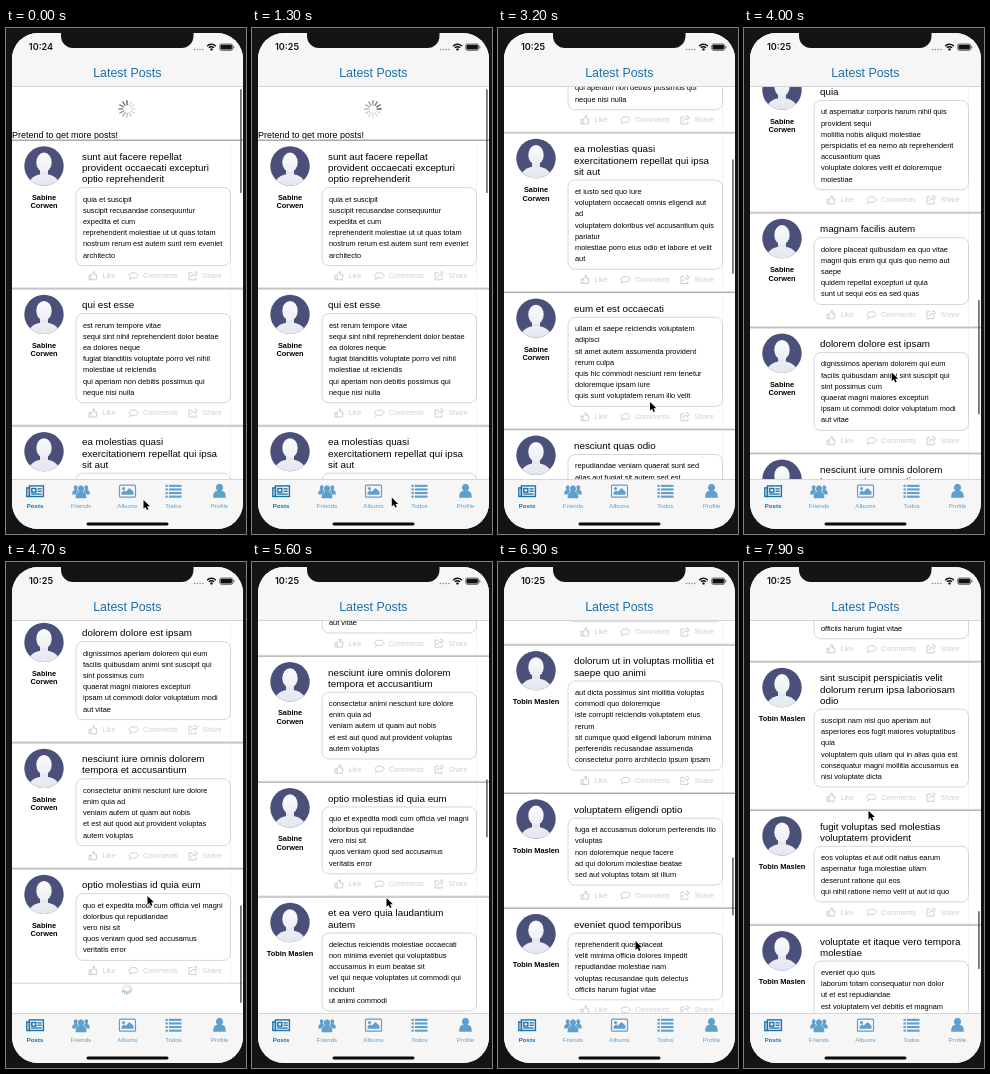
Recreate the animation shown at these times as an HTML page with a canvas. Size 240x506 px, loop 8 s.

```html
<!DOCTYPE html>
<html lang="en">
<head>
<meta charset="utf-8">
<title>Latest Posts</title>
<style>
html, body { margin: 0; width: 100%; height: 100%; overflow: hidden; background: #141414; }
canvas { display: block; width: 240px; height: 506px; }
</style>
</head>
<body>
<canvas id="stage"></canvas>
<script>
const W = 240, H = 506, LOOP = 8000;
const TOP = 59, BOTTOM = 451, VIEW = BOTTOM - TOP;
const REFRESH_END = 1500, MORE_LOADED = 4950, PAGE = 10;
const SANS = '"Liberation Sans", Arial, sans-serif';
const STATUS = 'Inter, "Liberation Sans", sans-serif';
const LINE = 11.2;
const BEZEL = '#141414', BAR = '#f6f6f7';

const canvas = document.getElementById('stage');
const ctx = canvas.getContext('2d');
const dpr = window.devicePixelRatio || 1;
canvas.width = W * dpr;
canvas.height = H * dpr;

// title lines / body lines, separated by "|"
const posts = [
  ['sunt aut facere repellat|provident occaecati excepturi|optio reprehenderit',
   'quia et suscipit|suscipit recusandae consequuntur|expedita et cum|reprehenderit molestiae ut ut quas totam|nostrum rerum est autem sunt rem eveniet|architecto'],
  ['qui est esse',
   'est rerum tempore vitae|sequi sint nihil reprehenderit dolor beatae|ea dolores neque|fugiat blanditiis voluptate porro vel nihil|molestiae ut reiciendis|qui aperiam non debitis possimus qui|neque nisi nulla'],
  ['ea molestias quasi|exercitationem repellat qui ipsa|sit aut',
   'et iusto sed quo iure|voluptatem occaecati omnis eligendi aut|ad|voluptatem doloribus vel accusantium quis|pariatur|molestiae porro eius odio et labore et velit|aut'],
  ['eum et est occaecati',
   'ullam et saepe reiciendis voluptatem|adipisci|sit amet autem assumenda provident|rerum culpa|quis hic commodi nesciunt rem tenetur|doloremque ipsam iure|quis sunt voluptatem rerum illo velit'],
  ['nesciunt quas odio',
   'repudiandae veniam quaerat sunt sed|alias aut fugiat sit autem sed est|voluptatem omnis possimus esse|voluptatibus quis|est aut tenetur dolor neque'],
  ['dolorem eum magni eos aperiam|quia',
   'ut aspernatur corporis harum nihil quis|provident sequi|mollitia nobis aliquid molestiae|perspiciatis et ea nemo ab reprehenderit|accusantium quas|voluptate dolores velit et doloremque|molestiae'],
  ['magnam facilis autem',
   'dolore placeat quibusdam ea quo vitae|magni quis enim qui quis quo nemo aut|saepe|quidem repellat excepturi ut quia|sunt ut sequi eos ea sed quas'],
  ['dolorem dolore est ipsam',
   'dignissimos aperiam dolorem qui eum|facilis quibusdam animi sint suscipit qui|sint possimus cum|quaerat magni maiores excepturi|ipsam ut commodi dolor voluptatum modi|aut vitae'],
  ['nesciunt iure omnis dolorem|tempora et accusantium',
   'consectetur animi nesciunt iure dolore|enim quia ad|veniam autem ut quam aut nobis|et est aut quod aut provident voluptas|autem voluptas'],
  ['optio molestias id quia eum',
   'quo et expedita modi cum officia vel magni|doloribus qui repudiandae|vero nisi sit|quos veniam quod sed accusamus|veritatis error'],
  ['et ea vero quia laudantium|autem',
   'delectus reiciendis molestiae occaecati|non minima eveniet qui voluptatibus|accusamus in eum beatae sit|vel qui neque voluptates ut commodi qui|incidunt|ut animi commodi'],
  ['in quibusdam tempore odit est|dolorem',
   'itaque id aut magnam|praesentium quia et ea odit et ea voluptas|et|sapiente quia nihil amet occaecati quia id|voluptatem|incidunt ea est distinctio odio'],
  ['dolorum ut in voluptas mollitia et|saepe quo animi',
   'aut dicta possimus sint mollitia voluptas|commodi quo doloremque|iste corrupti reiciendis voluptatem eius|rerum|sit cumque quod eligendi laborum minima|perferendis recusandae assumenda|consectetur porro architecto ipsum ipsam'],
  ['voluptatem eligendi optio',
   'fuga et accusamus dolorum perferendis illo|voluptas|non doloremque neque facere|ad qui dolorum molestiae beatae|sed aut voluptas totam sit illum'],
  ['eveniet quod temporibus',
   'reprehenderit quos placeat|velit minima officia dolores impedit|repudiandae molestiae nam|voluptas recusandae quis delectus|officiis harum fugiat vitae'],
  ['sint suscipit perspiciatis velit|dolorum rerum ipsa laboriosam|odio',
   'suscipit nam nisi quo aperiam aut|asperiores eos fugit maiores voluptatibus|quia|voluptatem quis ullam qui in alias quia est|consequatur magni mollitia accusamus ea|nisi voluptate dicta'],
  ['fugit voluptas sed molestias|voluptatem provident',
   'eos voluptas et aut odit natus earum|aspernatur fuga molestiae ullam|deserunt ratione qui eos|qui nihil ratione nemo velit ut aut id quo'],
  ['voluptate et itaque vero tempora|molestiae',
   'eveniet quo quis|laborum totam consequatur non dolor|ut et est repudiandae|est voluptatem vel debitis et magnam']
];

let listEnd = 0;
const items = posts.map(([title, body], i) => {
  const item = {
    title: title.split('|'),
    body: body.split('|'),
    author: i < PAGE ? ['Sabine', 'Corwen'] : ['Tobin Maslen'],
    top: listEnd
  };
  item.height = 70 + LINE * (item.title.length + item.body.length - 2);
  listEnd += item.height;
  return item;
});

const scrollKeys = [
  [0, -53], [REFRESH_END, -53], [1900, 0], [2450, 0], [3200, 239.7], [3700, 500],
  [4300, 900], [4600, 965], [5100, 965], [5600, 1051.4], [6200, 1290],
  [6900, 1577.6], [7400, 1760], [7900, 1938.8], [8000, 1968]
];
const cursorX = [[0, 137.5], [2400, 144], [3200, 152], [4700, 141.5], [5600, 134.5], [6900, 137.5], [7900, 124.5], [8000, 124.5]];
const cursorY = [[0, 472], [2400, 464], [3200, 374], [4700, 334], [5600, 336], [6900, 379], [7900, 248.7], [8000, 247]];

// Monotone cubic through [time, value] points
function track(keys, t) {
  const slope = i => i < 0 || i > keys.length - 2 ? 0
    : (keys[i + 1][1] - keys[i][1]) / (keys[i + 1][0] - keys[i][0]);
  const tangent = i => {
    const a = slope(i - 1), b = slope(i);
    return a * b <= 0 ? 0 : 2 * a * b / (a + b);
  };
  let i = 0;
  while (i < keys.length - 2 && t >= keys[i + 1][0]) i++;
  const [t0, v0] = keys[i], [t1, v1] = keys[i + 1];
  const d = t1 - t0, u = Math.min(1, (t - t0) / d), u2 = u * u, u3 = u2 * u;
  return v0 * (2 * u3 - 3 * u2 + 1) + v1 * (3 * u2 - 2 * u3)
    + d * tangent(i) * (u3 - 2 * u2 + u) + d * tangent(i + 1) * (u3 - u2);
}

function text(str, x, cy, size, color, align = 'left', weight = 400, family = SANS) {
  ctx.font = `${weight} ${size}px ${family}`;
  ctx.fillStyle = color;
  ctx.textAlign = align;
  ctx.fillText(str, x, cy + size * 0.34);
}

function rect(x, y, w, h, color) {
  ctx.fillStyle = color;
  ctx.fillRect(x, y, w, h);
}

function rounded(x, y, w, h, r) {
  ctx.beginPath();
  ctx.roundRect(x, y, w, h, r);
}

function disc(x, y, rx, ry, color) {
  ctx.fillStyle = color;
  ctx.beginPath();
  ctx.ellipse(x, y, rx, ry, 0, 0, Math.PI * 2);
  ctx.fill();
}

function at(x, y, draw) {
  ctx.save();
  ctx.translate(x, y);
  draw();
  ctx.restore();
}

// Icon paths are drawn around their own centre
const icons = {
  thumb: new Path2D('M-4 -.5h2v4.5h-2zM-2 -.3L0 -2.4V-4H1.4V-1H4L3.3 4H-2'),
  bubble: new Path2D('M0 -3C6 -3 6 2.4 0 2.4L-2 2.2L-4 3.8L-3.2 1.6C-6 -.2 -4 -3 0 -3z'),
  share: new Path2D('M-.5 -3H-4V4H3V1.6M-1.8 1.8C-1.8 -.6 0 -1.4 2 -1.4V.3L4.6 -2.2L2 -4.4V-2.8'),
  person: new Path2D('M0 -7a3.4 3.6 0 0 1 1.8 6.6C5 0 5.8 2 5.8 6H-5.8C-5.8 2 -5 0 -1.8 -.4A3.4 3.6 0 0 1 0 -7z'),
  mountains: new Path2D('M-6 3.6V1.4L-3.4 -1L-1.8 .5L2 -3.2L6 .6V3.6z')
};

function avatar(x, y) {
  at(x, y, () => {
    disc(0, 0, 19.7, 19.7, '#4a5079');
    ctx.clip();
    const shade = ctx.createLinearGradient(0, -14, 0, 20);
    shade.addColorStop(0, '#fafbfc');
    shade.addColorStop(1, '#e2e7ee');
    rect(-4, 0, 8, 11, '#e2e7ee');
    disc(0, 19, 15.5, 11, shade);
    disc(0, -3.6, 7.7, 9.8, shade);
  });
}

function action(icon, label, x, y) {
  at(x, y, () => {
    ctx.strokeStyle = '#c8c8ca';
    ctx.lineWidth = 0.9;
    ctx.stroke(icons[icon]);
  });
  text(label, x + 9.5, y, 7.2, '#cfcfd1');
}

function separator(y) {
  rect(6, y - 1, 231, 1, '#d6d6d6');
  rect(6, y, 231, 1, '#aaaaaa');
}

function drawItem(item, y) {
  separator(y);
  rect(224.3, y + 2, 0.7, item.height - 4, '#ededef');
  avatar(38, y + 26);
  item.author.forEach((s, i) => text(s, 38, y + 57 + i * 8.5, 7.4, '#000', 'center', 700));
  item.title.forEach((s, i) => text(s, 76, y + 16.5 + i * LINE, 9.8, '#000'));
  const lastTitle = y + 16 + LINE * (item.title.length - 1);
  const first = lastTitle + 20.6;
  const last = first + LINE * (item.body.length - 1);
  rounded(70, lastTitle + 9.2, 154.5, last - first + 22, 7);
  ctx.strokeStyle = '#d2d2d4';
  ctx.lineWidth = 0.9;
  ctx.stroke();
  item.body.forEach((s, i) => text(s, 77, first + i * LINE, 7.4, '#000'));
  action('thumb', 'Like', 87, last + 20.8);
  action('bubble', 'Comments', 127.5, last + 20.8);
  action('share', 'Share', 187, last + 20.8);
}

function spinner(x, y, inner, outer, rgb, t) {
  const head = Math.floor(t / 1000 * 12);
  at(x, y, () => {
    ctx.lineCap = 'round';
    ctx.lineWidth = outer / 6;
    for (let i = 0; i < 12; i++) {
      const age = ((head - i) % 12 + 12) % 12;
      const a = i * Math.PI / 6 - Math.PI / 2;
      ctx.strokeStyle = `rgba(${rgb},${Math.max(0.2, 0.9 - age * 0.085)})`;
      ctx.beginPath();
      ctx.moveTo(Math.cos(a) * inner, Math.sin(a) * inner);
      ctx.lineTo(Math.cos(a) * outer, Math.sin(a) * outer);
      ctx.stroke();
    }
  });
}

function drawIndicator(scroll, loaded, t) {
  const fade = t < 2500 ? 1 - (t - 1900) / 300 : (t - 2500) / 100;
  const alpha = Math.max(0, Math.min(1, fade));
  if (!alpha) return;
  const total = loaded ? 2640 : 1340;
  const over = Math.max(-scroll * 0.2, scroll - (total - VIEW), 0);
  const h = VIEW * VIEW / total - over;
  const y = Math.min(TOP + 2 + Math.max(0, scroll) * VIEW / total, BOTTOM - 1 - h);
  rounded(234, y, 1.8, h, 0.9);
  ctx.fillStyle = `rgba(70,70,72,${0.75 * alpha})`;
  ctx.fill();
}

function drawList(t) {
  const scroll = track(scrollKeys, t);
  const loaded = t >= MORE_LOADED;
  ctx.save();
  ctx.beginPath();
  ctx.rect(6, TOP, 231, VIEW);
  ctx.clip();
  if (scroll < -1) {
    ctx.globalAlpha = Math.min(1, -scroll / 50);
    spinner(121, 81, 4.2, 8.3, '85,85,90', t);
    ctx.globalAlpha = 1;
    text('Pretend to get more posts!', 6, TOP - scroll - 5, 9, '#000');
  }
  for (const item of loaded ? items : items.slice(0, PAGE)) {
    const y = TOP + item.top - scroll;
    if (y < BOTTOM && y + item.height > TOP) drawItem(item, y);
  }
  if (!loaded) {
    const y = TOP + items[PAGE].top - scroll;
    rect(6, y - 0.5, 231, 1, '#cfd2d6');
    spinner(121, y + 6, 2.7, 5.4, '40,125,190', t);
  }
  drawIndicator(scroll, loaded, t);
  ctx.restore();
}

function drawStatus(t) {
  text(t < 500 ? '10:24' : '10:25', 35, 19, 9.1, '#111', 'center', 600, STATUS);
  for (let i = 0; i < 4; i++) disc(188.5 + i * 2.8, 21.5, 0.8, 0.8, '#888');
  ctx.strokeStyle = '#111';
  ctx.lineCap = 'butt';
  ctx.lineWidth = 1.4;
  for (const r of [3.6, 6]) {
    ctx.beginPath();
    ctx.arc(205.5, 22.3, r, -Math.PI * 0.76, -Math.PI * 0.24);
    ctx.stroke();
  }
  disc(205.5, 21.4, 1.2, 1.2, '#111');
  ctx.lineWidth = 0.6;
  rounded(213.7, 16, 13, 6.4, 1.8);
  ctx.stroke();
  rounded(214.5, 16.8, 11.4, 4.8, 1);
  ctx.fillStyle = '#111';
  ctx.fill();
  rect(227.3, 18, 1, 2.4, '#555');
}

function drawNav(t) {
  rect(6, 5, 231, TOP - 5, BAR);
  rect(6, TOP - 1, 231, 1, '#d4d4d6');
  text('Latest Posts', 121.3, 45, 12.4, '#1b70a9', 'center');
  drawStatus(t);
}

const tabs = [
  ['Posts', 29, c => {
    ctx.strokeStyle = c;
    ctx.lineWidth = 1.4;
    ctx.strokeRect(-5.6, -5.3, 14, 10.6);
    ctx.strokeRect(-8.2, -3.3, 2.6, 8.6);
    ctx.strokeRect(-3.2, -2.7, 4, 3.6);
    for (const y of [-3, -0.6]) rect(2.5, y, 4.2, 1.3, c);
    rect(-3.8, 2.2, 10.5, 1.3, c);
  }],
  ['Friends', 75, c => {
    ctx.fillStyle = c;
    for (const x of [-5.2, 5.2]) at(x, -1, () => { ctx.scale(0.62, 0.7); ctx.fill(icons.person); });
    ctx.strokeStyle = BAR;
    ctx.lineWidth = 1.2;
    at(0, 1, () => { ctx.scale(0.92, 1); ctx.stroke(icons.person); ctx.fill(icons.person); });
  }],
  ['Albums', 121.5, c => {
    ctx.strokeStyle = ctx.fillStyle = c;
    ctx.lineWidth = 1.2;
    rounded(-8, -6, 16, 12, 1);
    ctx.stroke();
    ctx.fill(icons.mountains);
    disc(-4, -2.8, 1.5, 1.5, c);
  }],
  ['Todos', 167.5, c => {
    for (const y of [-6.4, -2.8, 0.8, 4.4]) {
      rect(-8, y, 2.3, 2.1, c);
      rect(-4.6, y, 12.6, 2.1, c);
    }
  }],
  ['Profile', 213.5, c => {
    ctx.fillStyle = c;
    ctx.scale(1.08, 1.08);
    ctx.fill(icons.person);
  }]
];

function drawTabs() {
  rect(6, BOTTOM, 231, 50, BAR);
  rect(6, BOTTOM, 231, 0.8, '#cfcfd1');
  tabs.forEach(([label, x, icon], i) => {
    const color = i ? '#5f9fca' : '#1872ad';
    at(x, 463.2, () => icon(color));
    text(label, x, 478.2, 6.1, color, 'center', i ? 400 : 700);
  });
  rounded(80.5, 494.5, 82, 3, 1.5);
  ctx.fillStyle = '#0a0a0a';
  ctx.fill();
}

const arrow = new Path2D('M0 0V8.8L2.1 6.9L3.5 10L5 9.3L3.6 6.3H6.4z');

function drawCursor(t) {
  at(track(cursorX, t), track(cursorY, t), () => {
    ctx.lineJoin = 'round';
    ctx.strokeStyle = '#fff';
    ctx.lineWidth = 1.2;
    ctx.stroke(arrow);
    ctx.fillStyle = '#000';
    ctx.fill(arrow);
  });
}

function draw(t) {
  ctx.setTransform(dpr, 0, 0, dpr, 0, 0);
  ctx.lineCap = 'butt';
  ctx.lineJoin = 'miter';
  rect(0, 0, W, H, BEZEL);

  ctx.save();
  rounded(6, 5, 231, 496, 26);
  ctx.fillStyle = '#fff';
  ctx.fill();
  ctx.clip();
  drawList(t);
  drawNav(t);
  drawTabs();
  rounded(55, -10, 132.5, 30, 12);
  ctx.fillStyle = BEZEL;
  ctx.fill();
  ctx.restore();

  drawCursor(t);
}

const start = performance.now();
function frame() {
  draw((performance.now() - start) % LOOP);
  requestAnimationFrame(frame);
}
frame();
</script>
</body>
</html>
```
